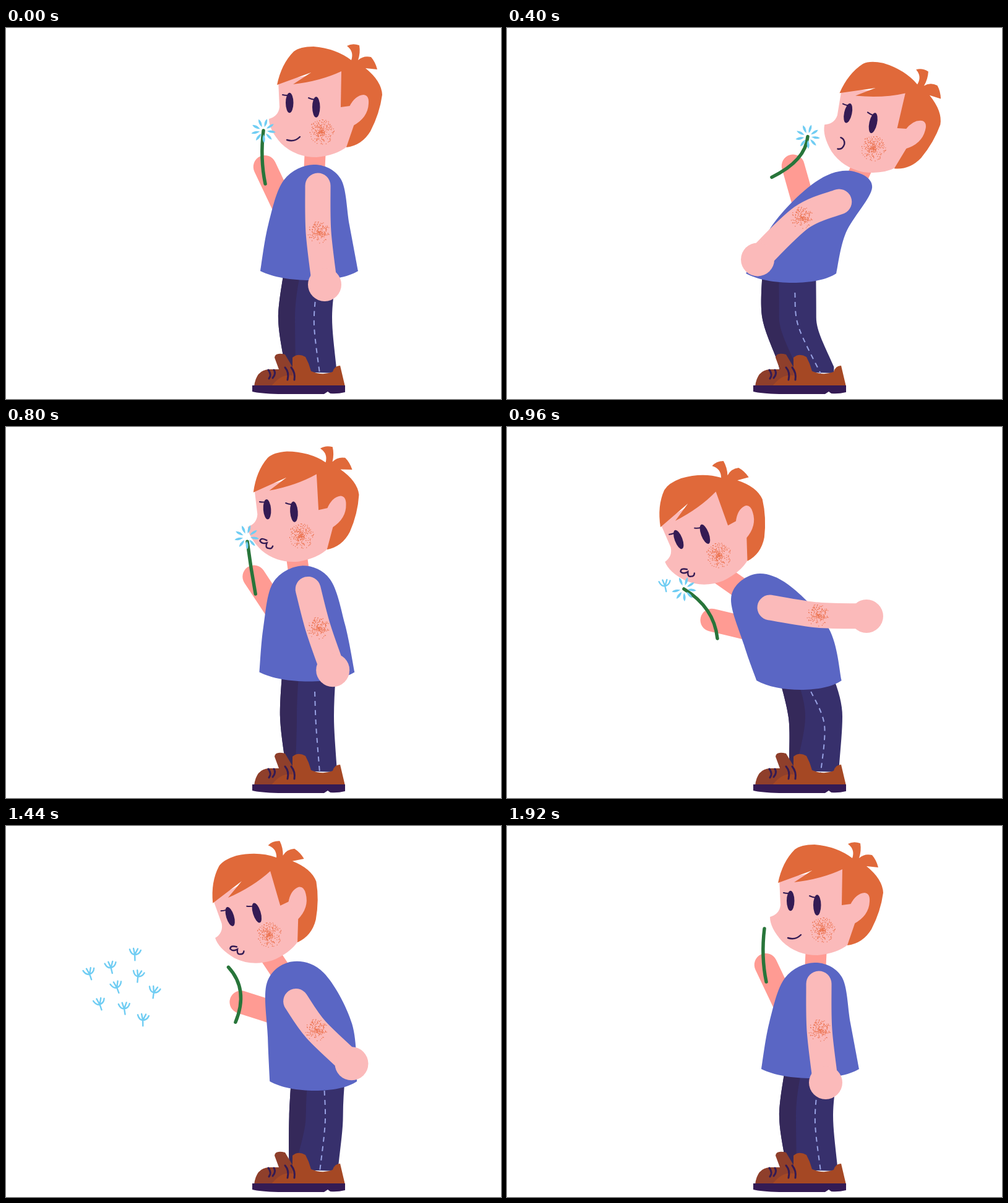
These frames come from a looping animation (800x600 px, 2240 ms). An HTML page with a canvas:

```html
<!DOCTYPE html>
<html lang="en">
<head>
<meta charset="utf-8">
<title>Blowing a dandelion</title>
<style>
html, body { margin: 0; width: 100%; height: 100%; overflow: hidden; background: #fff; }
canvas { display: block; width: 800px; height: 600px; }
</style>
</head>
<body>
<canvas id="stage" width="800" height="600"></canvas>
<script>
const ctx = document.getElementById('stage').getContext('2d');
const LOOP = 2240, STEP = 80, REST = 1920;
const SKIN = '#fbbaba', SHADE = '#ff9b93', SHIRT = '#5a66c4', HAIR = '#e0693a', DARK = '#341b54',
  JEANS = '#37306c', FAR_LEG = '#35295a', STITCH = '#97a1e2', SHOE = '#a54824', FAR_SHOE = '#8f3f2b',
  STEM = '#28753a', SEED = '#70cdf3', FRECKLE = '#ec7350';

// head: front eye and tilt; collar and hem: top and bottom of the shirt;
// arm: shoulder, elbow, hand; stem: tip, middle, end
const stand = { head: [458, 121, 0], collar: [497, 221], hem: [490, 393], knee: [440],
  arm: [504, 255, 505, 330, 515, 415], stem: [416, 166, 414, 210, 419, 252] };
const leanBack = { head: [551.5, 131, 12.3], collar: [553, 225], hem: [468, 397], knee: [418],
  arm: [540, 278, 482, 306, 425, 390], stem: [470, 164, 473, 208, 442, 248] };
const inhale = { head: [548, 144, 11], collar: [548, 238], hem: [452, 397], knee: [409],
  arm: [523, 283, 472, 308, 391, 360], stem: [498, 197, 455, 222, 402, 233] };
const blow = { head: [277, 182, -20.7], collar: [400, 238], hem: [472, 410], knee: [455],
  arm: [425, 292, 502, 304, 581, 306], stem: [286, 262, 324, 297, 340, 342] };
const watch = { head: [291, 174, -20.4], collar: [420, 230], hem: [502, 413], knee: [467],
  arm: [437, 297, 497, 320, 585, 339], stem: [288, 268, 330, 302, 347, 347] };
const rise = { head: [436, 122, -11.6], collar: [495, 212], hem: [491, 413], knee: [446],
  arm: [498, 266, 505, 335, 527, 418], stem: [430, 182, 425, 228, 399, 278] };

const lerp = (a, b, u) => a + (b - a) * u;
const mapPose = f => Object.fromEntries(Object.keys(stand).map(part => [part, stand[part].map((_, k) => f(part, k))]));
const passing = mapPose((part, k) => lerp(stand[part][k], blow[part][k], 0.2));
const POSES = [stand, leanBack, inhale, passing, blow, watch, rise, stand];
const TIMES = [0, 240, 640, 800, 960, 1280, 1600, REST];

// Monotone cubic interpolation, so that values do not overshoot
function poseAt(t) {
  const last = TIMES.length - 1;
  let i = 0;
  while (i < last - 1 && t >= TIMES[i + 1]) i++;
  const span = TIMES[i + 1] - TIMES[i], u = (t - TIMES[i]) / span;
  return mapPose((part, k) => {
    const value = j => POSES[j][part][k];
    const rate = j => j < 0 || j >= last ? 0 : (value(j + 1) - value(j)) / (TIMES[j + 1] - TIMES[j]);
    const slope = j => {
      const p = rate(j - 1), q = rate(j);
      return p * q > 0 ? 2 * p * q / (p + q) : 0;
    };
    return lerp(value(i), value(i + 1), u * u * (3 - 2 * u))
      + span * u * (1 - u) * (slope(i) * (1 - u) - slope(i + 1) * u);
  });
}

const path = d => new Path2D(d);
const face = path('M440 85 L442 128 Q440 143 425 147 Q425 165 445 187 Q468 209 502 209 Q534 206 552 191 L572 150 L560 65Z');
const hair = path('M438 92 Q445 58 465 38 Q475 30 497 30 Q533 33 558 52 Q563 38 551 29 Q560 24 571 28 Q573 40 569 52 ' +
  'Q578 44 590 47 Q597 55 600 67 L581 65 Q607 86 608 108 Q604 138 589 167 Q575 190 550 193 L563 155 L556 126 L541 128 ' +
  'L542 70 Q508 86 464 91 L493 72Z');
const ear = path('M555 127 Q564 109 578 108 Q587 109 586 122 Q585 145 561 158Z');
const lashes = path('M447 108 Q450 109 456 109 M489 113 Q493 115 499 116');
const eyes = path('M452 121 a6 15.5 0 1 0 12.5 0 a6 15.5 0 1 0 -12.5 0Z M495 128 a6 16 0 1 0 12.5 0 a6 16 0 1 0 -12.5 0Z');
const mouths = [
  { until: 160, shape: path('M454 181 Q466 185 475 176') },
  { until: 400, shape: path('M455 169 Q463 166 465 173 Q466 181 459 181 Q455 181 453 178') },
  { until: 800, shape: path('M455 162 Q462 163 463 171 Q462 181 454 181') },
  { until: 1520, shape: path('M454 171 Q445 165 443 171 Q446 177 454 175 Q450 183 456 184 Q461 186 463 181') },
  { until: 1760, shape: path('M454 172 Q457 175 460 172') }
];
const farShoe = path('M401 580 Q404 553 425 552 H441 L434 533 Q435 524 451 528 L470 560 V580Z');
const shoe = path('M428 580 Q445 558 463 562 V533 Q472 525 484 532 Q490 543 493 555 Q512 563 528 556 Q531 546 540 546 L548 580Z');
const sole = path('M398 578 H548 V589 Q536 592 524 591 L520 588 L514 592 H440 Q410 591 398 588Z');
const laces = path('M424 553 Q430 561 425 567 M433 553 Q437 559 431 566 M451 549 Q458 557 455 569 M461 549 Q468 558 466 569');

let state = 7;
const random = () => (state = state * 16807 % 2147483647) / 2147483647;
function freckles(radius, count) {
  const dots = new Path2D();
  while (count--) {
    const a = random() * Math.PI * 2, r = radius * random();
    dots.rect(Math.cos(a) * r, Math.sin(a) * r, 1.2, 1.2);
  }
  return dots;
}
const cheekDots = freckles(21, 280), armDots = freckles(18, 220);

// Smooth line through a flat list of points
function curve(p) {
  const line = new Path2D(), n = p.length / 2;
  const at = i => {
    const j = 2 * Math.max(0, Math.min(n - 1, i));
    return [p[j], p[j + 1]];
  };
  line.moveTo(p[0], p[1]);
  for (let i = 0; i < n - 1; i++) {
    const [a, b, c, d] = [at(i - 1), at(i), at(i + 1), at(i + 2)];
    line.bezierCurveTo(b[0] + (c[0] - a[0]) / 6, b[1] + (c[1] - a[1]) / 6,
      c[0] - (d[0] - b[0]) / 6, c[1] - (d[1] - b[1]) / 6, ...c);
  }
  return line;
}

function fill(shape, color) {
  ctx.fillStyle = color;
  ctx.fill(shape);
}

function stroke(shape, color, width, dash = []) {
  ctx.strokeStyle = color;
  ctx.lineWidth = width;
  ctx.lineCap = dash.length ? 'butt' : 'round';
  ctx.setLineDash(dash);
  ctx.stroke(shape);
}

function within(draw) {
  ctx.save();
  draw();
  ctx.restore();
}

function disc(x, y, r, color) {
  const shape = new Path2D();
  shape.arc(x, y, r, 0, 7);
  fill(shape, color);
}

function drawLegs({ head, hem, knee: [knee] }) {
  const hip = hem[0] - 42 - 0.4 * head[2], ankle = 451 + 0.45 * (knee - 443), heel = 535 + 0.2 * (knee - 446);
  // Wide strokes between a front and a back edge keep both edges smooth
  const leg = (width, foot, color) => {
    const shape = curve([hip, 400, knee, 470, ankle, 540, ankle + 3, 556]);
    shape.lineTo(foot, 558);
    shape.lineTo(foot, 548);
    shape.bezierCurveTo(lerp(foot, knee + width, 0.5), 515, knee + width, 490, knee + width, 468);
    shape.quadraticCurveTo(knee + width, 440, hip + width, 400);
    fill(shape, color);
  };
  leg(87, heel, JEANS);
  leg(27, 468, FAR_LEG);
  stroke(curve([hip + 53, 428, knee + 58, 482, 507, 559]), STITCH, 2, [8, 7]);
  fill(farShoe, FAR_SHOE);
  fill(shoe, SHOE);
  fill(sole, DARK);
  stroke(laces, DARK, 3);
}

function drawHead([x, y, tilt], t) {
  within(() => {
    ctx.translate(x, y);
    ctx.rotate(tilt * Math.PI / 180);
    ctx.translate(-458, -121);
    fill(face, SKIN);
    fill(hair, HAIR);
    fill(ear, SKIN);
    if (t < 560 || t >= 720) {
      fill(eyes, DARK);
      stroke(lashes, DARK, 2);
    }
    stroke((mouths.find(m => t < m.until) || mouths[0]).shape, DARK, 2.4);
    ctx.translate(509, 168);
    fill(cheekDots, FRECKLE);
  });
}

// The shirt bends with the tilt of the head
function drawTorso({ head, collar: [x, y], hem: [hx, hy], stem }) {
  const lean = head[2] / 10, half = 79 - 5 * Math.abs(lean), a = head[2] * Math.PI / 180;
  const front = [x - 48 - 5 * lean, y + 25 - 5.5 * lean], back = [x + 44 - 5 * lean, y + 23 + 3 * lean];
  const frontHem = [hx - half, hy], backHem = [hx + half, hy];
  const between = (p, q, dx, dy) => [(p[0] + q[0]) / 2 + dx, (p[1] + q[1]) / 2 + dy];

  const hand = [lerp(stem[2], stem[4], 0.25) + 3, lerp(stem[3], stem[5], 0.25) + 4];
  stroke(curve([...hand, front[0] + 5 - 15 * lean, front[1] + 54]), SHADE, 37);
  const neckX = head[0] + 42 * Math.cos(a) - 74 * Math.sin(a), neckY = head[1] + 42 * Math.sin(a) + 74 * Math.cos(a);
  stroke(curve([neckX, neckY, x + 2 * lean, y + 36]), SHADE, 34);

  const body = curve([...frontHem, ...between(frontHem, front, -6 - 3 * lean, -2 - 6 * lean), ...front,
    x, y, ...back, ...between(back, backHem, -11 * lean, 3 * lean), ...backHem]);
  body.bezierCurveTo(hx + half * 0.6, hy + 20, hx - half * 0.5, hy + 20, ...frontHem);
  fill(body, SHIRT);
}

function drawArm({ arm }) {
  stroke(curve(arm), SKIN, 41);
  disc(arm[4], arm[5], 27, SKIN);
  within(() => {
    ctx.translate(arm[2], arm[3]);
    fill(armDots, FRECKLE);
  });
}

const petal = path('M0 -6 Q-4 -14 0 -20 Q4 -14 0 -6Z');
const plume = path('M-9 -6 Q-6 2 0 2 Q7 1 9 -6 M-3 -8 L0 2 L4 -8 M0 2 L1 11');
const tuft = path('M-6 -4 Q-4 3 0 3 Q4 3 6 -4 M0 -3 V6');
const SEEDS = 9;

// Seeds leave the flower, the farthest first, spread on a spiral and drift away
function drawSeed(i, t, cx, cy) {
  const r = 65 * Math.sqrt((i + 0.5) / SEEDS), a = i * 2.4;
  const x = 215 - r * Math.cos(a), y = 257 - r * Math.sin(a);
  const start = Math.min(1040, 900 + 4 * (x - 155));
  within(() => {
    if (t <= start) {
      ctx.translate(cx, cy);
      ctx.rotate((i / SEEDS) * Math.PI * 2 - 0.4);
      fill(petal, SEED);
      return;
    }
    const u = 1 - (1 - Math.min(1, (t - start) / (1280 - start))) ** 1.3;
    const drift = Math.max(0, (t - 1280) / 320);
    ctx.translate(lerp(279, x, u) - 42 * drift, lerp(260, y, u) + 5 * drift);
    ctx.rotate(Math.sin(a + t / 300) * 0.25);
    if (t < 1480) stroke(plume, SEED, 2.4);
    else stroke(tuft, SEED, 2);
  });
}

function drawFlower({ stem: [x1, y1, mx, my, x2, y2] }, t) {
  const line = new Path2D();
  line.moveTo(x1, y1);
  line.quadraticCurveTo(2 * mx - (x1 + x2) / 2, 2 * my - (y1 + y2) / 2, x2, y2);
  stroke(line, STEM, 5.5);
  if (t >= 1840) return;
  // Breathing in pulls the flower off the tip
  const pull = 22 * Math.max(0, 1 - Math.abs(t - 640) / 240) / Math.hypot(x1 - mx, y1 - my);
  const cx = x1 + (x1 - mx) * pull, cy = y1 + (y1 - my) * pull;
  for (let i = 0; i < SEEDS; i++) drawSeed(i, t, cx, cy);
}

function frame() {
  const now = performance.now() % LOOP;
  const t = Math.min(REST, Math.floor(now / STEP) * STEP), pose = poseAt(t);
  ctx.clearRect(0, 0, 800, 600);
  drawLegs(pose);
  drawTorso(pose);
  drawHead(pose.head, t);
  drawArm(pose);
  drawFlower(pose, t);
  requestAnimationFrame(frame);
}
frame();
</script>
</body>
</html>
```
